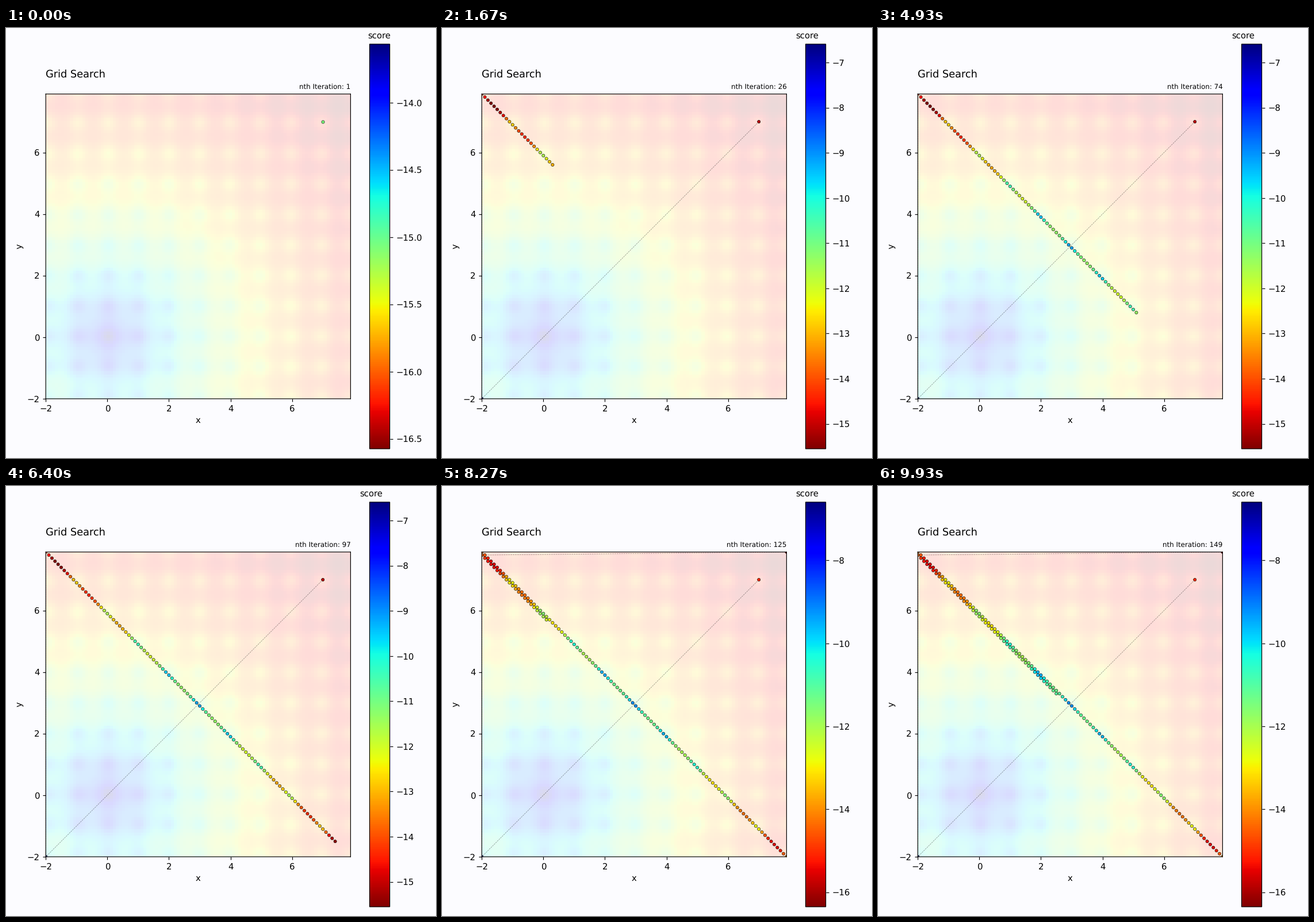
A matplotlib script that plays this animation: 748x748 px, repeating every 10000 ms.

```python
import numpy as np
import matplotlib.pyplot as plt
from matplotlib.animation import FuncAnimation

SIZE = 748
STEPS = 150
LOOP_MS = 10000
GRID = 100
LOW, STEP = -2.0, 0.1
HIGH = LOW + STEP * (GRID - 1)

plt.rcParams["font.family"] = "DejaVu Sans"
# Soft, subpixel placed lines and glyphs
plt.rcParams["path.snap"] = False
plt.rcParams["text.hinting"] = "none"


def score(x, y):
    """Negated Ackley function."""
    bowl = -20 * np.exp(-0.2 * np.sqrt(0.5 * (x**2 + y**2)))
    waves = -np.exp(0.5 * (np.cos(2 * np.pi * x) + np.cos(2 * np.pi * y)))
    return -(bowl + waves + np.e + 20)


def search_path():
    """One start point, then a diagonal walk over the whole grid."""
    cell = (np.arange(STEPS - 1) * (GRID - 1)) % GRID**2
    walk = LOW + STEP * np.column_stack([cell // GRID, cell % GRID])
    return np.vstack([[7.0, 7.0], walk])


def pixel_axes(left, top, width, height):
    box = np.array([left, SIZE - top - height, width, height]) / SIZE
    return fig.add_axes(list(box))


path = search_path()
scores = score(path[:, 0], path[:, 1])

fig = plt.figure(figsize=(7, 7), dpi=SIZE / 7, facecolor="#fcfcff")
ax = pixel_axes(69.2, 114.8, 530.2, 530.2)
bar_ax = pixel_axes(632.5, 28, 35.1, 704)

# Faint landscape behind the search
axis = LOW + STEP * np.arange(GRID)
ax.imshow(score(*np.meshgrid(axis, axis)), cmap="jet_r", alpha=0.15,
          origin="lower", extent=[LOW, HIGH, LOW, HIGH], aspect="auto")
ax.set_xlim(LOW, HIGH)
ax.set_ylim(LOW, HIGH)
ax.set_xticks(range(-2, 8, 2))
ax.set_yticks(range(-2, 8, 2))
ax.set_xlabel("x")
ax.set_ylabel("y")
ax.set_title("Grid Search\n", loc="left", fontsize=12)
counter = ax.set_title("nth Iteration: 1", loc="right", fontsize=8)

trail, = ax.plot([], [], "--", color="black", alpha=0.42, lw=0.5, zorder=1)
dots = ax.scatter(path[:1, 0], path[:1, 1], c=scores[:1], s=12, cmap="jet_r",
                  vmin=1.1 * scores[0], vmax=0.9 * scores[0],
                  edgecolors="black", linewidths=0.4, zorder=2)
bar = fig.colorbar(dots, cax=bar_ax)
bar.set_label("score", labelpad=-50, y=1.03, rotation=0)


def score_range(seen):
    # A lone value gets a band of ten percent on each side
    if len(seen) == 1:
        return 1.1 * seen[0], 0.9 * seen[0]
    return seen.min(), seen.max()


def update(frame):
    n = frame + 1
    trail.set_data(path[:n, 0], path[:n, 1])
    dots.set_offsets(path[:n])
    dots.set_array(scores[:n])
    dots.set_clim(*score_range(scores[:n]))
    counter.set_text(f"nth Iteration: {n}")
    return trail, dots, counter


anim = FuncAnimation(fig, update, frames=STEPS, interval=LOOP_MS / STEPS,
                     repeat=True, repeat_delay=0)
plt.show()
```
